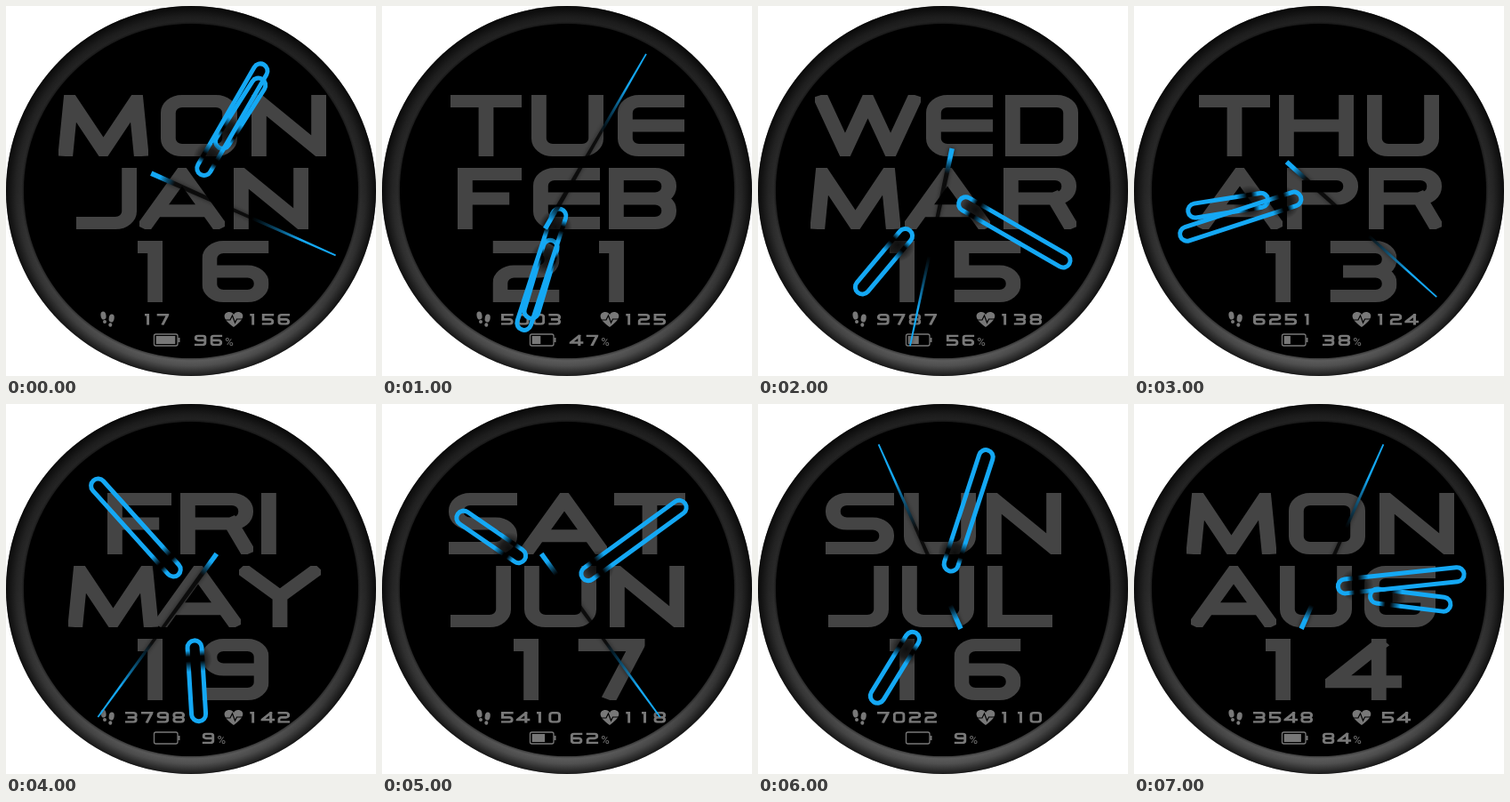
Write an HTML page with a canvas that moves like this. It is 416 px wide and 416 px high and loops after 8 s.

```html
<!DOCTYPE html>
<html lang="en">
<head>
<meta charset="utf-8">
<title>Watch face</title>
<style>
html, body { margin: 0; width: 100%; height: 100%; overflow: hidden; background: #fff; }
canvas { display: block; width: 416px; height: 416px; }
</style>
</head>
<body>
<canvas id="face" width="416" height="416"></canvas>
<script>
const canvas = document.getElementById('face');
const ctx = canvas.getContext('2d');
const C = 208, CAP = 69, HALF = 7, WIDEN = 1.2, SLOT = 96;
const BLUE = '20,168,244', GREY = '#444444', STATUS = '#787878';

// Glyph: pixel width at full size, then strokes over a 5x5 grid a..y.
// An uppercase point is a rounded corner.
const glyphs = {
  A: [96, 'ucy qs'], B: [76, 'aEOk kOYua'], D: [82, 'uaEYu'],
  E: [75, 'eAUy ko'], F: [72, 'eau kn'], G: [80, 'eAUYom'],
  H: [84, 'au ey ko'], I: [17, 'au'], J: [68, 'eYu'],
  L: [73, 'auy'], M: [101, 'uawey'], N: [84, 'uaye'],
  O: [86, 'cEYUAc'], P: [80, 'uaEOk'], R: [82, 'uaEOk ny'],
  S: [77, 'eAKOYu'], T: [80, 'ae cw'], U: [81, 'aUYe'],
  W: [119, 'avcxe'], Y: [92, 'ame mw'],
  0: [75, 'cEYUAc'], 1: [28, 'aey'], 2: [75, 'aEOKuy'],
  3: [75, 'aEOl lOYu'], 4: [86, 'dpt dx'], 5: [75, 'eakOYu'],
  6: [75, 'eAUYOk'], 7: [75, 'aew'], 8: [75, 'cEOKAc mOYUKm'],
  9: [75, 'oKAEYu']
};

const scenes = [
  { day: ['MON', 59, 174, 276], month: ['JAN', 79, 150, 256], date: '16', time: [1, 5, 19], steps: 17, pulse: 156, charge: 96 },
  { day: ['TUE', 77, 168, 265], month: ['FEB', 85, 170, 255], date: '21', time: [6, 33, 5], steps: 5003, pulse: 125, charge: 47 },
  { day: ['WED', 64, 189, 278], month: ['MAR', 59, 165, 276], date: '15', time: [7, 20, 32], steps: 9787, pulse: 138, charge: 56 },
  { day: ['THU', 73, 163, 262], month: ['APR', 71, 172, 264], date: '13', time: [8, 42, 22], steps: 6251, pulse: 124, charge: 38 },
  { day: ['FRI', 114, 196, 287], month: ['MAY', 70, 168, 262], date: '19', time: [5, 53, 36], steps: 3798, pulse: 142, charge: 9 },
  { day: ['SAT', 75, 157, 261], month: ['JUN', 77, 160, 256], date: '17', time: [10, 9, 24], steps: 5410, pulse: 118, charge: 62 },
  { day: ['SUN', 76, 164, 257], month: ['JUL', 79, 162, 258], date: '16', time: [7, 3, 56], steps: 7022, pulse: 110, charge: 9 },
  { day: ['MON', 59, 174, 276], month: ['AUG', 64, 164, 259], date: '14', time: [3, 14, 4], steps: 3548, pulse: 54, charge: 84 }
];

function gridPoint(letter, width, taper) {
  const n = letter.toLowerCase().charCodeAt(0) - 97;
  const row = Math.floor(n / 5) / 4;
  const reach = (n % 5 / 4 - 0.5) * (width - 2 * HALF);
  return [width / 2 + reach * (1 - taper * (1 - row)), HALF + row * (CAP - 2 * HALF)];
}

function drawGlyph(char, x, y, scale, color) {
  const [pixels, strokes] = glyphs[char];
  const width = pixels / WIDEN;
  ctx.save();
  ctx.translate(x, y);
  ctx.scale(scale * WIDEN, scale);
  ctx.beginPath();
  ctx.rect(0, 0, width, CAP);
  ctx.clip();
  ctx.beginPath();
  for (const stroke of strokes.split(' ')) {
    const points = [...stroke].map(p => gridPoint(p, width, char === 'M' ? 0.13 : 0));
    points.forEach((p, i) => {
      if (!i) ctx.moveTo(...p);
      else if (stroke[i] < 'a') ctx.arcTo(...p, ...points[i + 1], 13);
      else ctx.lineTo(...p);
    });
  }
  ctx.lineWidth = 2 * HALF;
  ctx.lineCap = 'square';
  ctx.lineJoin = 'miter';
  ctx.strokeStyle = color;
  ctx.stroke();
  ctx.restore();
}

function drawWord([word, ...xs], y) {
  [...word].forEach((char, i) => drawGlyph(char, xs[i], y, 1, GREY));
}

function drawNumber(value, center, y, scale, color) {
  const digits = String(value);
  const left = center - digits.length * SLOT * scale / 2;
  [...digits].forEach((d, i) => {
    const x = left + (i * SLOT + (SLOT - glyphs[d][0]) / 2) * scale;
    drawGlyph(d, x, y, scale, color);
  });
}

function gradient(g, stops) {
  stops.forEach(([at, color]) => g.addColorStop(at, color));
  return g;
}

function disc(radius, fill) {
  ctx.fillStyle = fill;
  ctx.beginPath();
  ctx.arc(C, C, radius, 0, 2 * Math.PI);
  ctx.fill();
}

function drawCase() {
  disc(208, gradient(ctx.createLinearGradient(0, 0, 0, 416), [
    [0, '#202020'], [0.5, '#2a2a2a'], [0.8, '#404040'], [1, '#626262']]));
  disc(208, gradient(ctx.createRadialGradient(C, C, 187, C, C, 208), [
    [0, 'rgba(0,0,0,.45)'], [0.18, 'rgba(0,0,0,0)'], [0.45, 'rgba(0,0,0,.15)'], [1, 'rgba(0,0,0,.75)']]));
  disc(188, '#000');
}

function ellipse(x, y, rx, ry, turn) {
  ctx.beginPath();
  ctx.ellipse(x, y, rx, ry, turn, 0, 2 * Math.PI);
  ctx.fill();
}

function drawFeet() {
  ctx.fillStyle = STATUS;
  ellipse(109.5, 348, 3, 4.6, -0.15);
  ellipse(111, 355, 2, 2, 0);
  ellipse(118.7, 351, 3, 4.6, 0.15);
  ellipse(117.3, 358.5, 2, 2.2, 0);
}

function drawHeart() {
  ctx.fillStyle = STATUS;
  ctx.beginPath();
  ctx.moveTo(256, 361);
  ctx.bezierCurveTo(240, 350, 246, 344, 251, 344);
  ctx.quadraticCurveTo(254.5, 344, 256, 347);
  ctx.quadraticCurveTo(257.5, 344, 261, 344);
  ctx.bezierCurveTo(266, 344, 272, 350, 256, 361);
  ctx.fill();
  ctx.strokeStyle = '#000';
  ctx.lineWidth = 1.2;
  ctx.beginPath();
  ctx.moveTo(246, 353);
  ctx.lineTo(252, 353);
  ctx.lineTo(254.5, 348);
  ctx.lineTo(257.5, 356);
  ctx.lineTo(259.5, 352);
  ctx.lineTo(266, 352);
  ctx.stroke();
}

function drawBattery(charge) {
  ctx.strokeStyle = ctx.fillStyle = STATUS;
  ctx.lineWidth = 1.3;
  ctx.beginPath();
  ctx.roundRect(166.5, 369, 26.5, 13, 2);
  ctx.stroke();
  ctx.fillRect(193.5, 373, 2, 5);
  ctx.fillRect(168.7, 371, Math.floor(charge / 10) * 2.4, 9);
}

function drawStatus({ steps, pulse, charge }) {
  const small = 0.185;
  drawFeet();
  drawHeart();
  drawBattery(charge);
  drawNumber(steps, 167.5, 346, small, STATUS);
  drawNumber(pulse, 294.5, 346, small, STATUS);
  drawNumber(charge, 227.5, 369.5, small, STATUS);
  ctx.fillStyle = STATUS;
  ctx.font = '13px Roboto, sans-serif';
  ctx.fillText('%', 228.5 + String(charge).length * SLOT * small / 2, 382);
}

// Runs paint with the pivot at the origin and the hand pointing up.
function turned(degrees, paint) {
  ctx.save();
  ctx.translate(C, C);
  ctx.rotate(degrees * Math.PI / 180);
  paint();
  ctx.restore();
}

function drawSlotHand(degrees, near, far) {
  turned(degrees, () => {
    const dark = near + 13;
    ctx.fillStyle = gradient(ctx.createRadialGradient(0, -dark, 0, 0, -dark, 19), [
      [0, 'rgba(0,0,0,.8)'], [0.5, 'rgba(0,0,0,.6)'], [1, 'rgba(0,0,0,0)']]);
    ctx.fillRect(-20, -dark - 20, 40, 40);
    const at = d => (d - near + 11) / (far - near + 22);
    ctx.strokeStyle = gradient(ctx.createLinearGradient(0, 11 - near, 0, -far - 11), [
      [0, `rgb(${BLUE})`], [at(near + 3), `rgb(${BLUE})`], [at(near + 10), '#000'],
      [at(near + 15), '#000'], [at(near + 27), `rgb(${BLUE})`], [1, `rgb(${BLUE})`]]);
    ctx.lineWidth = 5;
    ctx.beginPath();
    ctx.roundRect(-8, -far - 8, 16, far - near + 16, 8);
    ctx.stroke();
  });
}

function drawSecondHand(degrees) {
  turned(degrees, () => {
    const tip = 178, tail = 49;
    const at = d => (d + tail) / (tip + tail);
    ctx.fillStyle = gradient(ctx.createLinearGradient(0, tail, 0, -tip), [
      [0, `rgb(${BLUE})`], [at(-38), `rgb(${BLUE})`], [at(-20), 'rgba(0,0,0,.75)'],
      [at(75), 'rgba(0,0,0,.75)'], [at(135), `rgb(${BLUE})`], [1, `rgb(${BLUE})`]]);
    ctx.shadowColor = 'rgba(0,0,0,.7)';
    ctx.shadowBlur = 5;
    ctx.beginPath();
    ctx.moveTo(-2.8, tail);
    ctx.lineTo(2.8, tail);
    ctx.lineTo(0.9, -tip);
    ctx.lineTo(-0.9, -tip);
    ctx.fill();
  });
}

function draw(now) {
  const scene = scenes[Math.floor(now % 8000 / 1000)];
  const [hour, minute, second] = scene.time;
  ctx.clearRect(0, 0, 416, 416);
  drawCase();
  drawWord(scene.day, 100);
  drawWord(scene.month, 182);
  drawNumber(scene.date, 210, 264, 1, GREY);
  drawStatus(scene);
  drawSlotHand(hour * 30 + minute / 2, 66, 141);
  drawSlotHand(minute * 6, 29.5, 156);
  drawSecondHand(second * 6);
}

const start = performance.now();
function tick() {
  draw(performance.now() - start);
  requestAnimationFrame(tick);
}
tick();
</script>
</body>
</html>
```
